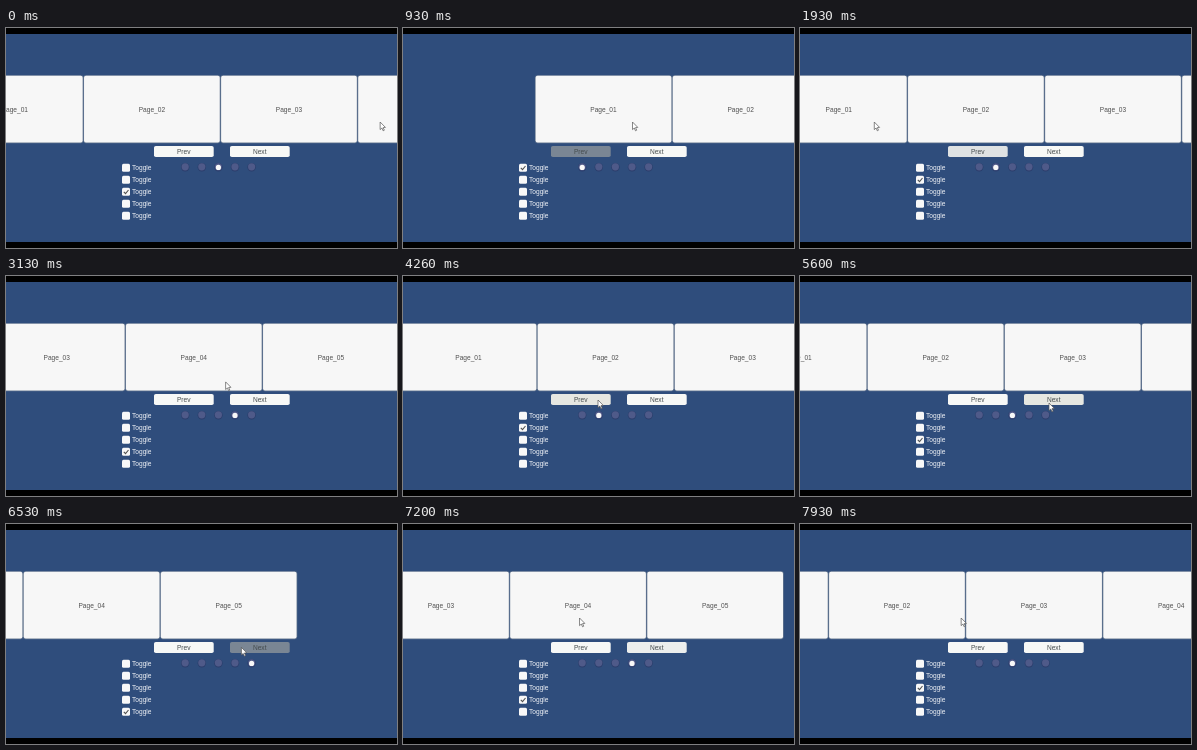
An HTML page with a canvas that plays this animation: 391 by 220 pixels, repeating every 8 s.

```html
<!DOCTYPE html>
<html lang="en">
<head>
<meta charset="utf-8">
<title>Page scroller</title>
<style>
  html, body { margin: 0; width: 100%; height: 100%; overflow: hidden; background: #000; }
  canvas { display: block; }
</style>
</head>
<body>
<canvas id="stage" width="391" height="220"></canvas>
<script>
const ctx = document.getElementById('stage').getContext('2d');
const LOOP = 8000, PITCH = 137.1, REST_X = 127;
const DRAG_TIME = 160, SETTLE_TIME = 450, FADE_TIME = 100, DRAG_Y = 94;
const BLUE = '#2f4d7c', WHITE = [247, 248, 246], HOVER = [230, 231, 225], DISABLED = [122, 134, 148];
const PREV = { x: 195, y: 124 }, NEXT = { x: 249, y: 127 };

const clamp = u => Math.max(0, Math.min(1, u));
const mix = (a, b, u) => a + (b - a) * u;
const mixPoint = (a, b, u) => ({ x: mix(a.x, b.x, u), y: mix(a.y, b.y, u) });
const rgb = (a, b, u) => `rgb(${a.map((v, i) => Math.round(mix(v, b[i], u)))})`;
const smooth = u => u * u * (3 - 2 * u);
const backOut = u => 1 + 2.70158 * (u - 1) ** 3 + 1.70158 * (u - 1) ** 2;

// A move selects its page at time `at`; a drag first pulls the strip by `pull` pages.
const click = (at, page, button) => ({ at, begin: at, page, pull: 0, from: button, to: button });
const drag = (at, page, pull, x) => ({
  at, begin: at - DRAG_TIME, page, pull,
  from: { x, y: DRAG_Y }, to: { x: x - pull * PITCH, y: DRAG_Y }
});

const moves = [
  click(-SETTLE_TIME, 3, NEXT),
  drag(40, 2, -.85, 286),
  drag(700, 1, -.55, 200),
  drag(1300, 1, -.25, 190),
  drag(1850, 2, 1.4, 252),
  drag(2420, 3, .7, 200),
  drag(2806, 4, .3, 277),
  click(3560, 3, PREV),
  click(4065, 2, PREV),
  click(4560, 1, PREV),
  click(5100, 2, NEXT),
  click(5553, 3, NEXT),
  click(6003, 4, NEXT),
  click(6423, 5, NEXT),
  drag(7110, 4, -.5, 124),
  drag(7560, 3, -.6, 124),
  drag(8040, 2, -.85, 124)
];

function stateAt(t) {
  const i = moves.findIndex(move => move.at > t) - 1;
  const last = moves[i], next = moves[i + 1];
  const previous = i ? moves[i - 1].page : last.page;
  const age = t - last.at;
  const pulled = clamp((t - next.begin) / DRAG_TIME);
  const travel = smooth(clamp(age / (next.begin - last.at)));
  return {
    page: last.page,
    previous,
    fade: clamp(age / FADE_TIME),
    position: mix(previous + last.pull, last.page, backOut(clamp(age / SETTLE_TIME))) + next.pull * pulled,
    pointer: t < next.begin ? mixPoint(last.to, next.from, travel) : mixPoint(next.from, next.to, pulled)
  };
}

function box(x, y, w, h, r, fill) {
  ctx.fillStyle = fill;
  ctx.beginPath();
  ctx.roundRect(x, y, w, h, r);
  ctx.fill();
}

function disc(x, y, r, fill) {
  ctx.fillStyle = fill;
  ctx.beginPath();
  ctx.arc(x, y, r, 0, 7);
  ctx.fill();
}

function label(text, x, y, color, align = 'center') {
  ctx.font = '6.6px "Liberation Sans", Arial, sans-serif';
  ctx.textAlign = align;
  ctx.fillStyle = color;
  ctx.fillText(text, x, y + 2.3);
}

function drawPages(position) {
  for (let n = 1; n <= 5; n++) {
    const x = REST_X + (n - position) * PITCH;
    box(x - .7, 47.2, PITCH, 68, 2.4, '#697a92');
    box(x, 47.8, PITCH - 1.4, 66.7, 2, '#f7f7f7');
    label('Page_0' + n, x + PITCH / 2 - .7, 81.3, '#505050');
  }
}

function drawButton(text, x, lastPage, { page, previous, fade, pointer }) {
  const over = pointer.x >= x && pointer.x <= x + 60 && pointer.y >= 118 && pointer.y <= 129;
  const shade = current => current === lastPage ? DISABLED : over ? HOVER : WHITE;
  box(x, 118, 59.7, 11, 1.8, rgb(shade(previous), shade(page), fade));
  label(text, x + 29.7, 123.8, '#444b4d');
}

function drawToggle(n, checked) {
  const y = 127.7 + n * 12;
  box(116, y - 4, 8, 8, 1.5, '#f8f8f8');
  label('Toggle', 126, y + .2, '#f2f4f8', 'left');
  if (!checked) return;
  ctx.strokeStyle = '#505050';
  ctx.lineWidth = 1.1;
  ctx.beginPath();
  ctx.moveTo(117.8, y + .2);
  ctx.lineTo(119.5, y + 1.9);
  ctx.lineTo(122.5, y - 1.7);
  ctx.stroke();
}

function drawDot(n, selected) {
  const x = 162.6 + n * 16.6;
  disc(x, 139.2, 4.2, '#2c3e6c');
  disc(x, 138.8, 3.6, '#4f5a89');
  if (selected) disc(x, 139.4, 2.6, '#f8f8f8');
}

function drawPointer({ x, y }) {
  ctx.beginPath();
  [[0, 0], [0, 7.6], [1.8, 6], [3, 8.8], [4.2, 8.2], [3, 5.6], [5.3, 5.4]]
    .forEach(([dx, dy]) => ctx.lineTo(x + dx, y + dy));
  ctx.closePath();
  ctx.fillStyle = '#fff';
  ctx.fill();
  ctx.strokeStyle = '#555';
  ctx.lineWidth = .7;
  ctx.stroke();
}

function draw(t) {
  const state = stateAt(t);
  ctx.fillStyle = '#000';
  ctx.fillRect(0, 0, 391, 220);
  ctx.fillStyle = BLUE;
  ctx.fillRect(0, 6, 391, 208);
  drawPages(state.position);
  drawButton('Prev', 148, 1, state);
  drawButton('Next', 224, 5, state);
  for (let n = 1; n <= 5; n++) {
    drawToggle(n, n === state.page);
    drawDot(n, n === state.page);
  }
  drawPointer(state.pointer);
}

const start = performance.now();
function tick() {
  draw((performance.now() - start) % LOOP);
  requestAnimationFrame(tick);
}
tick();
</script>
</body>
</html>
```
